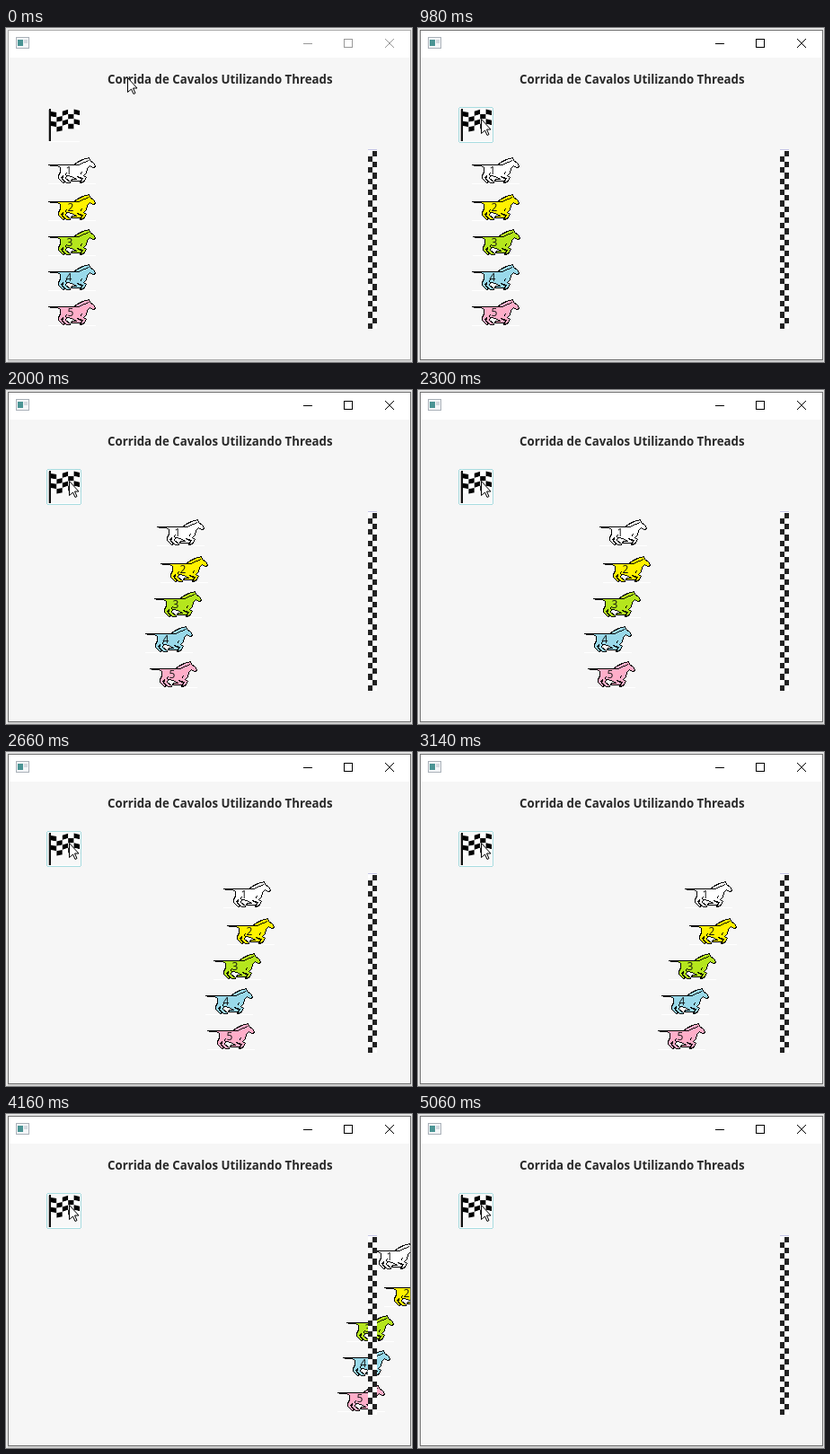
Recreate the animation shown at these times as an HTML page. Size 452 by 372 pixels, loop 5920 ms.

```html
<!DOCTYPE html>
<html lang="pt">
<head>
<meta charset="utf-8">
<style>
html, body { margin: 0; width: 100%; height: 100%; overflow: hidden; background: #e6e6e6; }
svg { display: block; shape-rendering: crispEdges; }
text { fill: #292929; font-family: "Open Sans", "Noto Sans", sans-serif; }
.title { font-size: 13.25px; font-weight: 700; }
.horse text { font-size: 12px; text-anchor: middle; fill: #111; }
.horse path { stroke: #000; }
.line { fill: none; }
</style>
</head>
<body>
<svg width="452" height="372" viewBox="0 0 452 372">
  <defs>
    <clipPath id="pane"><rect x="3" y="33" width="447" height="336"/></clipPath>
  </defs>
  <rect x="2" y="370" width="449" height="2" fill="#cfcfcf"/>
  <rect x="2.5" y="2.5" width="448" height="367" fill="#f6f6f6" id="frame"/>
  <rect x="3" y="3" width="447" height="30" fill="#fff"/>

  <!-- title bar -->
  <rect x="11.5" y="10.5" width="14" height="12" fill="#f4f6f8" stroke="#a9b0b8"/>
  <rect x="13" y="13" width="6" height="7" fill="#4a9494"/>
  <rect x="20" y="13" width="4" height="4" fill="#d3d9df"/>
  <g id="buttons" fill="none">
    <path d="M331 17.5H341M376.5 12.5H385.5V21.5H376.5Z"/>
    <path d="M422 12L432 22M432 12L422 22" shape-rendering="auto"/>
  </g>

  <text class="title" x="113" y="62">Corrida de Cavalos Utilizando Threads</text>

  <!-- start button -->
  <rect id="hover" x="45.5" y="88.5" width="38" height="39" rx="2" fill="#f8f8f8" stroke="#a8dce0"/>
  <path d="M47 126.5H82" stroke="#fff"/>
  <g id="flag" shape-rendering="auto"></g>
  <path d="M47.5 91V126" stroke="#bbb"/>
  <path d="M49 90V126" stroke="#111" stroke-width="2"/>

  <g id="horses" clip-path="url(#pane)"></g>

  <!-- finish line -->
  <rect x="403" y="136" width="10" height="199" fill="#fff"/>
  <path d="M403 135.5H413" stroke="#c4c4e6"/>
  <g stroke="#222" stroke-width="5" stroke-dasharray="6.2">
    <path d="M405.5 335V137"/>
    <path d="M410.5 328.8V137"/>
  </g>

  <path id="cursor" d="M.5 .5V16.5L4.5 13L7 18.5L9 17.5L6.5 12H11Z" fill="#fff" stroke="#000" shape-rendering="auto"/>
</svg>
<script>
const LOOP = 5920, MOVE = 330, FOCUS = 730, START = 860, STEP = 60;
const times = [860, 980, 2000, 2660, 3620, 4160, 5060];
const body = 'M0 8H28L32 5L38 2L45 0L46 3L50 6L52 9L51 11H49L46 9L43 12L42 17L39 20' +
  'L42 22L39 27L35 28L38 23L32 21L37 24L35 26H25L26 24H31L26 21L20 20L19 23L24 27' +
  'V28H20L15 24L16 20L14 22L18 27L16 28L11 23V20L13 16V11L10 9H3Z';
const detail = 'M28 8H33L40 5L45 3M18 20L20 17M35 19L37 16';

// row top, fill, label offset, x at each time
const runners = [
  [144, '#fff', 23, [48, 60, 168, 242, 352, 404, 490]],
  [185, '#fff200', 25, [48, 60, 172, 246, 358, 421, 505]],
  [224, '#b5e61d', 24, [48, 61, 165, 231, 326, 379, 463]],
  [263, '#99d9ea', 23, [48, 60, 155, 222, 319, 375, 459]],
  [302, '#ffaec9', 25, [48, 60, 160, 224, 310, 369, 452]]
];

const get = id => document.getElementById(id);

get('horses').innerHTML = runners.map(([, fill, label], i) =>
  `<g class="horse"><path d="M0 29.5H53" style="stroke:#fff"/>
   <g transform="translate(.5 .5)"><path d="${body}" fill="${fill}"/><path class="line" d="${detail}"/></g>
   <text x="${label}" y="19">${i + 1}</text></g>`).join('');
const horses = [...get('horses').children];

// waving chequered cloth
const wave = x => 93 + 1.4 * Math.sin((x - 50) / 4.6) - (x - 50) * .06;
let cloth = '';
for (let c = 0; c < 5; c++) for (let r = 0; r < 4; r++) {
  const x = 50 + c * 6.4, x2 = x + 6.4, y = wave(x) + r * 5.4, y2 = wave(x2) + r * 5.4;
  cloth += `<path d="M${x} ${y}L${x2} ${y2}v5.4L${x} ${y + 5.4}Z" fill="${(c + r) % 2 ? '#fff' : '#000'}"/>`;
}
get('flag').innerHTML = cloth;

function position(xs, t) {
  if (t < START) return 47;
  const k = Math.max(1, times.findIndex(v => v >= t));
  const u = (t - times[k - 1]) / (times[k] - times[k - 1]);
  return Math.round(xs[k - 1] + (xs[k] - xs[k - 1]) * u);
}

function draw(now) {
  const t = now % LOOP, active = t >= FOCUS;
  const tick = t < START ? 0 : Math.min(5060, START + Math.floor((t - START) / STEP) * STEP);
  runners.forEach(([y, , , xs], i) =>
    horses[i].setAttribute('transform', `translate(${position(xs, tick)} ${y})`));
  get('cursor').setAttribute('transform', t < MOVE ? 'translate(135 55)' : 'translate(70 101)');
  get('hover').setAttribute('visibility', active ? 'visible' : 'hidden');
  get('buttons').setAttribute('stroke', active ? '#000' : '#999');
  get('frame').setAttribute('stroke', active ? '#707070' : '#aaa');
}

const begin = performance.now();
function loop() {
  draw(performance.now() - begin);
  requestAnimationFrame(loop);
}
loop();
</script>
</body>
</html>
```
